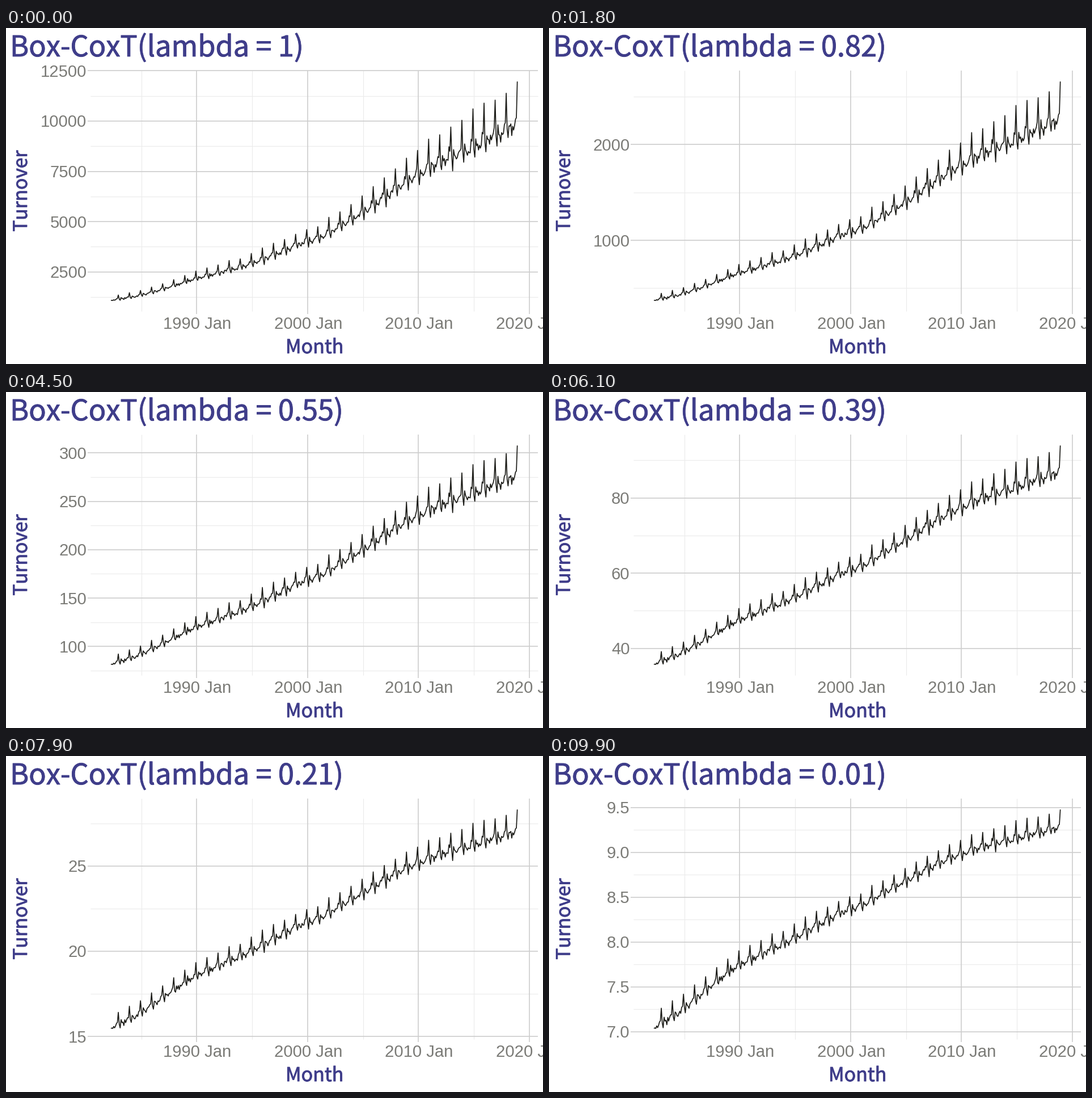
A matplotlib script for the animation above (10000 ms loop, 947 by 592 pixels).

```python
from math import ceil, floor, log10

import matplotlib.pyplot as plt
import numpy as np
from matplotlib import patheffects
from matplotlib.animation import FuncAnimation
from matplotlib.collections import LineCollection

W, H, DPI = 947, 592, 64
PT = 72 / DPI  # points per pixel
FRAMES, INTERVAL = 100, 100
LEFT, RIGHT, TOP, BOTTOM = 149.3, 938, 75, 499.3
INK, GREY, GRID, FAINT = "#3f3d8a", "#7b7b77", "#cecece", "#ebebeb"
HUMANIST, PLAIN = "Noto Sans CJK JP", "Liberation Sans"

# Turns in the yearly growth rate: (year, turnover)
TURNS = [(1982.3, 1090), (1984.5, 1288), (1989.5, 2108), (1994.5, 2825), (1999.5, 3953),
         (2000.5, 4028), (2008.5, 6850), (2012.5, 8127), (2019, 9830)]
FIRST, LAST = 1084, 11964


def make_series():
    """Monthly turnover, April 1982 to December 2018."""
    month = np.arange(3, 37 * 12)
    year = 1982 + month / 12
    m = month % 12 + 1
    knots, level = np.array(TURNS).T
    log_y = np.interp(year, knots, np.log(level))
    log_y += np.random.default_rng(4).normal(0, 0.011, m.size)
    log_y += np.select(
        [m == 2, m == 3, m == 6, (m == 10) | (m == 11), m == 12],
        [-0.06, 0.035, -0.033, 0.037, 0.15 + 0.04 * ((year - 2000.5) / 18) ** 2])
    y = np.maximum(np.exp(log_y), FIRST)
    y[0], y[-1] = FIRST, LAST
    return year, y


def x_px(year):
    return 336.5 + 19.545 * (year - 1990)


def box_cox(y, lam):
    return (y**lam - 1) / lam


def nice_breaks(lo, hi, m=5):
    """Extended Wilkinson labelling: the best scoring evenly spaced breaks."""
    steps = [1, 5, 2, 2.5, 4, 3]
    span = hi - lo
    best, found = -2, None

    def total(simple, cover, dense):
        return 0.25 * simple + 0.2 * cover + 0.5 * dense + 0.05

    for j in range(1, 50):
        for i, q in enumerate(steps):
            simple = 1 - i / (len(steps) - 1) - j
            if total(simple + 1, 1, 1) < best:
                return found
            for k in range(2, 50):
                dense_max = 2 - (k - 1) / (m - 1) if k >= m else 1
                if total(simple + 1, 1, dense_max) < best:
                    break
                z = ceil(log10(span / (k + 1) / j / q))
                while True:
                    step = j * q * 10.0**z
                    z += 1
                    width = step * (k - 1)
                    half = max(width - span, 0) / 2
                    cover_max = 1 - (half / (0.1 * span)) ** 2
                    if total(simple + 1, cover_max, dense_max) < best:
                        break
                    first = floor(hi / step) * j - (k - 1) * j
                    for start in range(first, ceil(lo / step) * j + 1):
                        a = start * step / j
                        b = a + width
                        zero = start % j == 0 and a <= 0 <= b
                        cover = 1 - 0.5 * ((hi - b) ** 2 + (lo - a) ** 2) / (0.1 * span) ** 2
                        r = (k - 1) / width
                        rt = (m - 1) / (max(b, hi) - min(a, lo))
                        score = total(simple + zero, cover, 2 - max(r / rt, rt / r))
                        if score > best:
                            best, found = score, a + step * np.arange(k)
    return found


def decimals(values):
    return next(d for d in range(6) if np.allclose(values, np.round(values, d), atol=1e-8))


year, turnover = make_series()

fig = plt.figure(figsize=(W / DPI, H / DPI), dpi=DPI, facecolor="white")
ax = fig.add_axes([0, 0, 1, 1])
ax.set_xlim(0, W)
ax.set_ylim(H, 0)
ax.axis("off")


def heading(x, y, s, px, **kw):
    bolder = [patheffects.Stroke(linewidth=0.9 * PT, foreground=INK), patheffects.Normal()]
    return ax.text(x, y, s, fontsize=px * PT, color=INK, family=HUMANIST,
                   va="baseline", path_effects=bolder, **kw)


def tick_label(x, y, s, ha):
    return ax.text(x, y, s, fontsize=29.3 * PT, color=GREY, family=PLAIN,
                   va="baseline", ha=ha)


def rules(color, px, zorder):
    return ax.add_collection(
        LineCollection([], colors=color, linewidths=px * PT, zorder=zorder))


minor, major = rules(FAINT, 1.1, 1), rules(GRID, 1.7, 2)
x_minor = [[(x_px(t), TOP), (x_px(t), BOTTOM)] for t in range(1985, 2016, 10)]
x_major = [[(x_px(t), TOP), (x_px(t), 504)] for t in range(1990, 2021, 10)]
(line,) = ax.plot([], [], color="#1c1c18", lw=1.7 * PT, zorder=3,
                  solid_joinstyle="round", solid_capstyle="butt")

title = heading(7, 50, "", 50.5)
heading(544, 573, "Month", 34, ha="center")
heading(37, 287, "Turnover", 33.5, ha="center", rotation=90, rotation_mode="anchor")
for t in range(1990, 2021, 10):
    tick_label(x_px(t) + 1, 530.5, f"{t} Jan", "center")
labels = [tick_label(142.5, 0, "", "right") for _ in range(12)]


def draw(i):
    lam = 1 - 0.998 * i / (FRAMES - 1)
    v = box_cox(turnover, lam)
    pad = 0.05 * (v.max() - v.min())
    base, top = v.min() - pad, v.max() + pad

    def y_px(u):
        return BOTTOM - (u - base) / (top - base) * (BOTTOM - TOP)

    breaks = nice_breaks(base, top)
    step = breaks[1] - breaks[0]
    halves = np.append(breaks - step / 2, breaks[-1] + step / 2)
    shown = [b for b in breaks if base <= b <= top]
    halves = [b for b in halves if base <= b <= top]

    minor.set_segments(x_minor + [[(LEFT, y_px(b)), (RIGHT, y_px(b))] for b in halves])
    major.set_segments(x_major + [[(144, y_px(b)), (RIGHT, y_px(b))] for b in shown])
    places = decimals(shown)
    for n, label in enumerate(labels):
        if n < len(shown):
            label.set_text(f"{shown[n]:.{places}f}")
            label.set_y(y_px(shown[n]) + 10.5)
        else:
            label.set_text("")
    line.set_data(x_px(year), y_px(v))
    title.set_text(f"Box-CoxT(lambda = {(100 - i) / 100:g})")
    return [minor, major, line, title, *labels]


anim = FuncAnimation(fig, draw, frames=FRAMES, interval=INTERVAL, repeat=True,
                     repeat_delay=0, blit=False)
plt.show()
```
